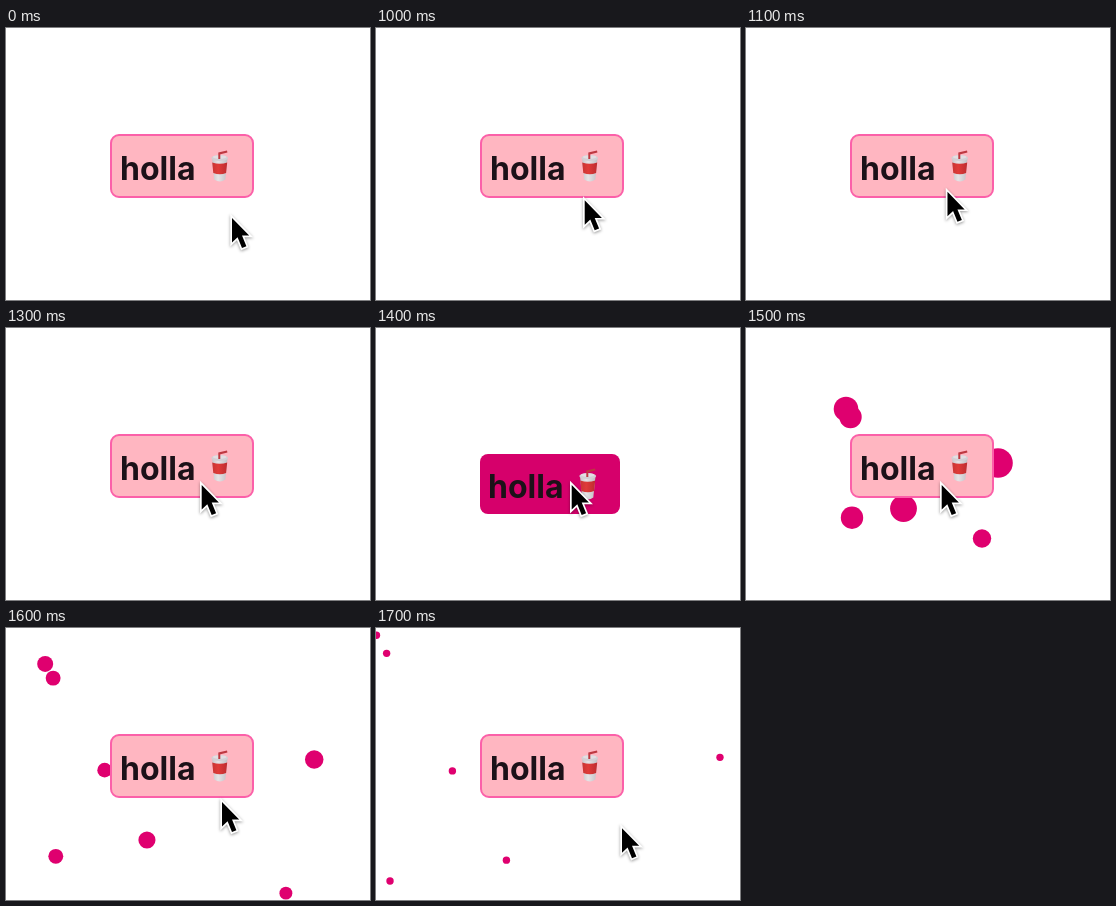
An HTML page for the animation above (1.8 s loop, 364 by 272 pixels).

```html
<!DOCTYPE html>
<html lang="en">
<head>
<meta charset="utf-8">
<title>Bubbly button</title>
<style>
  html, body { margin: 0; width: 100%; height: 100%; overflow: hidden; background: #fff; }
  svg { display: block; width: 364px; height: 272px; }
  text { font: 700 32px Inter, "Liberation Sans", sans-serif; fill: #1c1118; }
  #arrow { filter: drop-shadow(0 1.5px 1.5px rgba(0, 0, 0, .4)); }
</style>
</head>
<body>
<svg viewBox="0 0 364 272">
  <defs>
    <linearGradient id="paper">
      <stop offset="0" stop-color="#c9c5c9"/>
      <stop offset=".4" stop-color="#e6e3e6"/>
      <stop offset="1" stop-color="#c2bec3"/>
    </linearGradient>
    <linearGradient id="band">
      <stop offset="0" stop-color="#c93434"/>
      <stop offset=".4" stop-color="#df3b39"/>
      <stop offset="1" stop-color="#bf2c30"/>
    </linearGradient>
  </defs>
  <g id="bubbles" fill="#df006f"></g>
  <rect id="box"/>
  <g id="label">
    <text x="114" y="152">holla</text>
    <path d="M206 130 L208.2 151.5 Q214 155.5 219.3 151.5 L221.5 130 Z" fill="url(#paper)"/>
    <path d="M206.2 134.5 Q214 137 221.2 134.5 L220.1 145 Q214 147.5 207.3 145 Z" fill="url(#band)"/>
    <ellipse cx="213.7" cy="130" rx="8.4" ry="3" fill="#d3cfd4"/>
    <ellipse cx="213.7" cy="129" rx="6.8" ry="1.8" fill="#e2dfe3"/>
    <path d="M213.3 131 V125.4 L221.2 123.6" fill="none" stroke="#bd3840" stroke-width="2"/>
  </g>
  <path id="arrow" d="M0 0 V24.5 L5.6 19.3 L10 30 L14.4 28.2 L10 17.6 H17.2 Z"
        stroke="#fff" stroke-width="3.4" paint-order="stroke"/>
</svg>
<script>
const $ = id => document.getElementById(id);
const set = (el, attrs) => {
  for (const k in attrs) el.setAttribute(k, attrs[k]);
};

const LOOP = 1800, STEP = 100, PRESS = 14, BURST = 15;
const center = [179, 139.5];

// Bubble offset from the centre at the burst, then its radius
const bubbles = [
  [-79, -58.5, 12.3], [-74.5, -50.5, 11.2], [73, -4.5, 14.8], [-21.5, 41, 13.4],
  [-73, 50.2, 11.2], [57, 71, 9.2], [-45.4, 1.5, 11]
].map(([x, y, r]) => {
  const el = document.createElementNS("http://www.w3.org/2000/svg", "circle");
  $("bubbles").append(el);
  return { el, x, y, r };
});

// Pointer tip by step: rest, approach, click, leave
function pointer(step) {
  if (step < 10) return [226, 190];
  if (step < 13) {
    const left = ((13 - step) / 3) ** 2;
    return [195.7 + 13 * left, 157 + 15.3 * left];
  }
  if (step <= BURST) return [195.7, 157];
  return step === 16 ? [216, 174] : [246, 200.2];
}

function draw(ms) {
  const step = Math.floor(ms % LOOP / STEP);
  const pressed = step === PRESS;

  set($("box"), pressed
    ? { x: 104, y: 126, width: 140, height: 60, rx: 8, fill: "#d6006b", stroke: "none" }
    : { x: 105, y: 107, width: 142, height: 62, rx: 8, fill: "#ffb6c1", stroke: "#fb60a9", "stroke-width": 2 });
  set($("label"), { transform: pressed ? "translate(-2 18)" : "" });
  set($("arrow"), { transform: `translate(${pointer(step)})` });

  const age = step - BURST;
  set($("bubbles"), { visibility: age < 0 ? "hidden" : "visible" });
  const spread = 1 + 0.91 * age - 0.14 * age * age;
  for (const { el, x, y, r } of bubbles) {
    set(el, {
      cx: center[0] + x * spread,
      cy: center[1] + y * spread,
      r: r + (3.7 - r) * Math.max(age, 0) / 2
    });
  }
}

const start = performance.now();
function tick() {
  draw(performance.now() - start);
  requestAnimationFrame(tick);
}
tick();
</script>
</body>
</html>
```
